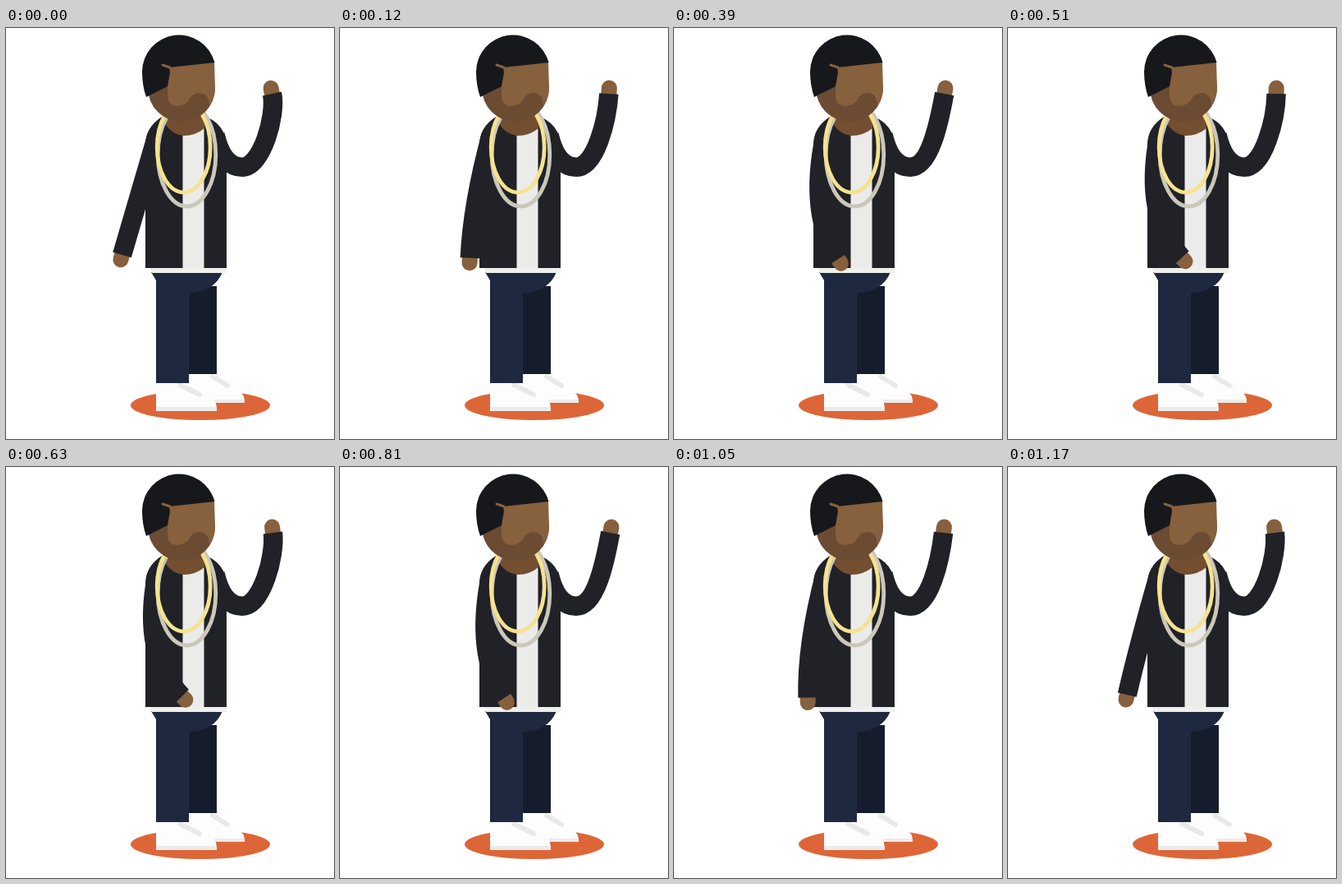
An HTML page that plays this animation: 400x500 px, repeating every 1200 ms.

```html
<!DOCTYPE html>
<html lang="en">
<head>
<meta charset="utf-8">
<title>Waving figure</title>
<style>
  html, body { margin: 0; width: 100%; height: 100%; overflow: hidden; background: #fff; }
  svg { display: block; width: 400px; height: 500px; }
  .skin { fill: #87603d; }
  .beard { fill: #6b4b32; }
  .hair { fill: #16181c; }
  .coat { fill: #212227; }
  .sleeve { fill: none; stroke: #212227; stroke-width: 23.5; }
  .hand { fill: none; stroke: #87603d; stroke-width: 19; stroke-linecap: round; }
  .shoe { fill: #fdfdfd; }
  .sole { fill: #ebebeb; }
  .lace { fill: none; stroke: #e9e9e9; stroke-width: 6; stroke-linecap: round; }
  .chain { fill: none; stroke-width: 4.8; }
</style>
</head>
<body>
<svg viewBox="0 0 400 500">
  <ellipse cx="237" cy="459" rx="85" ry="18" fill="#dd6638"/>

  <!-- rear leg and shoe -->
  <path class="shoe" d="M223 420H257L273 438Q276 443 284 443Q291 444 291 456H230Z"/>
  <path class="sole" d="M240 452H291V454Q291 456 289 456H240Z"/>
  <path class="lace" d="M252 424L270 435"/>
  <path fill="#151d2c" d="M222 314H257V421H222Z"/>

  <!-- front leg and shoe -->
  <path class="shoe" d="M183 432H222L237 445Q241 448 247 447Q257 449 257 466H183Z"/>
  <path class="sole" d="M183 461H257V464Q257 466 255 466H185Q183 466 183 464Z"/>
  <path class="lace" d="M212 434L236 446"/>
  <path fill="#1e293f" d="M177 297H264Q254 321 223 322.5V432H183V307Z"/>

  <!-- raised arm -->
  <path id="waveHand" class="hand"/>
  <path id="waveArm" class="sleeve"/>

  <!-- torso -->
  <path fill="#ebebea" d="M210 120H245V292H210Z"/>
  <path fill="#eef0ec" d="M175 291H269V298H178Z"/>
  <path class="coat" d="M190 108Q170 121 170 142V292H215.5V120Z"/>
  <path class="coat" d="M238 106Q269 115 269 146V292H241.5V120Z"/>
  <path fill="#744e30" d="M192 104H242V122Q231 131 217 131Q200 129 192 113Z"/>

  <!-- swinging arm -->
  <path id="swingHand" class="hand"/>
  <path id="swingArm" class="sleeve"/>

  <ellipse class="chain" cx="220.5" cy="154" rx="35.3" ry="63" stroke="#cbc8ba"/>
  <ellipse class="chain" cx="216.7" cy="145" rx="32.5" ry="55" stroke="#f6e28f"/>

  <!-- head -->
  <circle class="beard" cx="214" cy="73" r="41"/>
  <path class="skin" d="M190 44L254 40L255 73A41 41 0 0 1 248 95Q248 79 235 79Q226 80 223 88Q218 95 208 95Q197 94 197 82V70L199 54Z"/>
  <path class="hair" d="M171 84Q166 70 166 53A45 45 0 0 1 254.5 42L199 48L200 54L197 71Z"/>
  <path d="M191 45L200 48" stroke="#87603d" stroke-width="3" stroke-linecap="round"/>
</svg>
<script>
  const LOOP = 1200, STEP = 30;
  const mix = (a, b, p) => a + (b - a) * p;
  // 0..1..0 over one period
  const yoyo = (t, period) => 1 - Math.abs(1 - 2 * (t % period) / period);

  function drawArm(name, start, [cx, cy], [x, y], reach) {
    const k = reach / Math.hypot(x - cx, y - cy);
    const set = (part, d) => document.getElementById(name + part).setAttribute("d", d);
    set("Arm", `${start} ${cx} ${cy} ${x} ${y}`);
    set("Hand", `M${x} ${y}l${(x - cx) * k} ${(y - cy) * k}`);
  }

  // the cuff hangs from the shoulder like a pendulum
  function drawSwing(t) {
    const u = yoyo(t, LOOP), p = u + u * u * (1 - u);
    const angle = mix(16, -11.6, p) * Math.PI / 180;
    const cuff = [184 - 154 * Math.sin(angle), 128 + 154 * Math.cos(angle)];
    drawArm("swing", "M184 131Q", [mix(160, 165, p), mix(212, 229, p)], cuff, 6);
  }

  // the forearm bends twice per loop, slowing at the far side
  function drawWave(t) {
    const u = yoyo(t, LOOP / 2), p = u + u * (1 - u) / 2;
    drawArm("wave", "M255 130C262 160 275 169.3 288 169.3C312 169.3",
      [mix(330, 321.5, p), mix(106, 118, p)], [mix(324.5, 331, p), 80], 7);
  }

  function frame() {
    const t = Math.floor(performance.now() % LOOP / STEP) * STEP;
    drawSwing(t);
    drawWave(t);
    requestAnimationFrame(frame);
  }
  frame();
</script>
</body>
</html>
```
